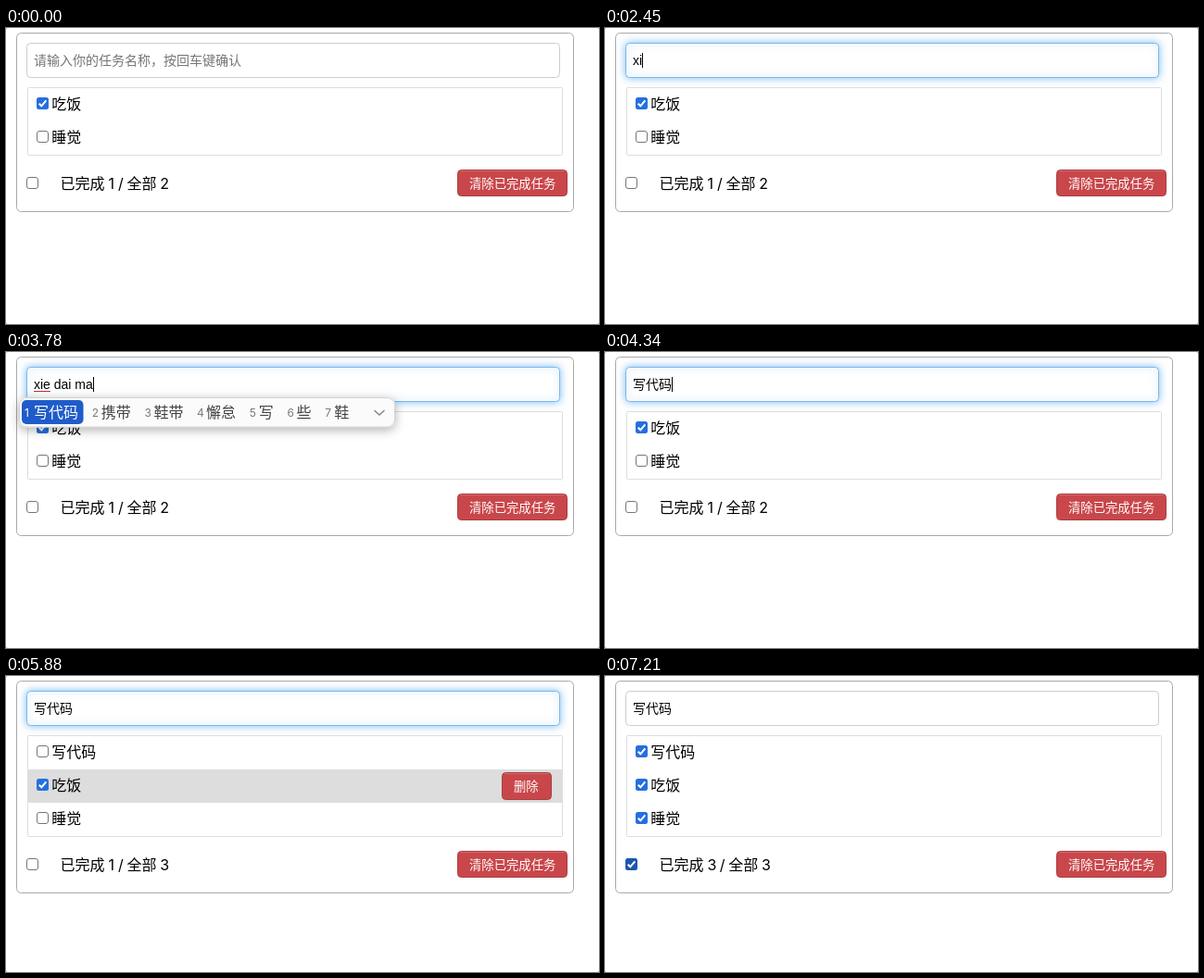
These frames come from a looping animation (640x320 px, 8000 ms). An HTML page with a canvas:

```html
<!DOCTYPE html>
<html lang="zh-CN">
<head>
<meta charset="utf-8">
<title>任务清单</title>
<style>
html, body { margin: 0; width: 100%; height: 100%; overflow: hidden; background: #fff; }
canvas { display: block; width: 640px; height: 320px; }
</style>
</head>
<body>
<canvas id="stage"></canvas>
<script>
const LOOP = 8000;
const CJK = '"Noto Sans CJK SC", "Noto Sans CJK", sans-serif';
const LATIN = '"Liberation Sans", Arial, sans-serif';
const UI = 'Inter, sans-serif';

const canvas = document.getElementById('stage');
const ctx = canvas.getContext('2d');
const dpr = window.devicePixelRatio || 1;
canvas.width = 640 * dpr;
canvas.height = 320 * dpr;
ctx.scale(dpr, dpr);

// Each track holds [start time, value] steps.
const typed = [
  [0, ''], [1820, 'x'], [1960, 'xi'], [2100, 'xie'], [2450, 'xi'], [2520, 'x'], [2660, ''],
  [3010, 'x'], [3080, 'xi'], [3150, 'xie'], [3360, 'xie d'], [3430, 'xie da'],
  [3570, 'xie dai'], [3710, 'xie dai m'], [3780, 'xie dai ma'], [3920, '写代码']
];
const caret = [
  [0, false], [1190, true], [1680, false], [1820, true], [4480, false], [5040, true],
  [5530, false], [6090, true], [6580, false]
];
const candidates = [
  [0, ''], [3010, '写 小 想 下 ⬇ 向 新 🆕'], [3080, '系 洗 西 细 喜 戏 吸 希'],
  [3150, '写 些 谢 鞋 斜 歇 携 协'], [3360, '写的 写到 谢的 写 些 谢 鞋'],
  [3430, '写大 写打 写 些 谢 鞋 斜'], [3640, '携带 鞋带 懈怠 写 些 鞋'],
  [3710, '写代码 携带 鞋带 懈怠 写 些 鞋'], [3920, '']
];
const hoverRow = [
  [0, -1], [4480, 0], [5460, 1], [5530, 0], [5880, 1], [6020, 2], [6090, -1]
];

function at(track, t) {
  let value = track[0][1];
  for (const [start, v] of track) if (t >= start) value = v;
  return value;
}

function text(str, x, y, size, color, family = CJK, weight = 400) {
  ctx.font = `${weight} ${size}px ${family}`;
  ctx.fillStyle = color;
  ctx.fillText(str, x, y);
  return ctx.measureText(str).width;
}

function box(x, y, w, h, r, fill, stroke) {
  ctx.beginPath();
  ctx.roundRect(x, y, w, h, r);
  if (fill) { ctx.fillStyle = fill; ctx.fill(); }
  if (stroke) { ctx.strokeStyle = stroke; ctx.lineWidth = 1; ctx.stroke(); }
}

function line(points, color, width) {
  ctx.beginPath();
  points.forEach(([x, y]) => ctx.lineTo(x, y));
  ctx.strokeStyle = color;
  ctx.lineWidth = width;
  ctx.stroke();
}

function shadow(color, blur, dy = 0) {
  ctx.shadowColor = color;
  ctx.shadowBlur = blur * dpr;
  ctx.shadowOffsetY = dy * dpr;
}

function checkbox(x, y, checked, hovered) {
  if (!checked) {
    box(x + .5, y + .5, 12, 12, 2.5, '#fff', hovered ? '#4f4f4f' : '#767676');
    return;
  }
  box(x, y, 13, 13, 2.5, hovered ? '#1b57ad' : '#2570de');
  line([[x + 2.7, y + 6.7], [x + 5.3, y + 9.3], [x + 10.3, y + 3.3]], '#fff', 2);
}

function button(label, x, y, w, h) {
  shadow('rgba(0,0,0,.08)', 2, 1);
  box(x + .5, y + .5, w - 1, h - 1, 4, '#c9474b');
  shadow('transparent', 0);
  line([[x + 3, y + 1.5], [x + w - 3, y + 1.5]], 'rgba(255,255,255,.2)', 1);
  box(x + .5, y + .5, w - 1, h - 1, 4, null, '#a83c40');
  text(label, x + 13, y + h / 2 + 5, 13.333, '#fff');
}

function input(t, value) {
  const focused = t >= 1190 && t < 7140;
  if (focused) shadow('rgba(82,168,236,.75)', 8);
  box(22.5, 16.5, 575, 37, 4, '#fff', focused ? '#7db8e8' : '#ccc');
  shadow('transparent', 0);

  let width = 0;
  if (!value) {
    text('请输入你的任务名称，按回车键确认', 30, 40.3, 14, '#757575');
  } else {
    const latin = value[0] === 'x';
    width = text(value, 30, latin ? 40 : 40.3, 14, '#000', latin ? LATIN : CJK);
  }
  if (t >= 3010 && t < 3920) {
    const first = value.split(' ')[0];
    ctx.font = `14px ${LATIN}`;
    ctx.fillStyle = first === value ? '#222' : '#a33';
    ctx.fillRect(30, 42, ctx.measureText(first).width, 1);
  }
  if (focused && at(caret, t)) {
    ctx.fillStyle = '#000';
    ctx.fillRect(30 + Math.round(width), 27, 1, 16);
  }
}

function emoji(kind, x) {
  const g = ctx.createLinearGradient(0, 54, 0, 74);
  g.addColorStop(0, '#86a5ba');
  g.addColorStop(1, '#587b98');
  box(x, 54, 20, 20, 3.5, g);
  if (kind === '🆕') {
    text('NEW', x + 2, 66.6, 7, '#fff', UI, 700);
    return;
  }
  ctx.fillStyle = '#fff';
  ctx.fillRect(x + 7.5, 57, 5, 7);
  ctx.beginPath();
  ctx.moveTo(x + 3.5, 63.5);
  ctx.lineTo(x + 16.5, 63.5);
  ctx.lineTo(x + 10, 71);
  ctx.fill();
}

function popup(words) {
  shadow('rgba(0,0,0,.3)', 11, 3);
  box(14, 49, 406, 32.5, 8, '#fbfbfb');
  shadow('transparent', 0);
  box(14.5, 49.5, 405, 31.5, 8, null, '#d2d2d2');

  let x = 20;
  words.split(' ').forEach((word, i) => {
    const picture = word === '⬇' || word === '🆕';
    const width = picture ? 22 : word.length * 16;
    if (!i) box(17, 52, width + 18.5, 26, 5, '#1f5cca');
    text(i + 1, x, 69.5, 12, i ? '#7a7a7a' : '#fff', UI);
    if (picture) emoji(word, x + 11);
    else text(word, x + 10, 71, 16, i ? '#444' : '#fff');
    x += width + 24.7;
  });
  line([[397.5, 63], [403, 68], [408.5, 63]], '#808080', 1.3);
}

function summary(done, total, y) {
  const shift = done > 1 ? 2.7 : 0;
  text('已完成', 58.5, y, 16, '#000');
  text(done, 110.5, y, 16, '#000', UI);
  text('/', 121 + shift, y, 16, '#000', UI);
  text('全部', 130.5 + shift, y, 16, '#000');
  text(total, 166.3 + shift, y, 16, '#000', UI);
}

function draw(t) {
  const added = t >= 5460;
  const all = t >= 7210;
  const tasks = [['吃饭', true], ['睡觉', false]];
  if (added) tasks.unshift(['写代码', false]);
  const bottom = 65 + tasks.length * 36;
  const hovered = at(hoverRow, t);

  ctx.fillStyle = '#fff';
  ctx.fillRect(0, 0, 640, 320);
  ctx.fillStyle = '#bbb';
  for (const x of [0, 639]) for (const y of [0, 319]) ctx.fillRect(x, y, 1, 1);

  box(11.5, 5.5, 601, bottom + 56, 5, '#fff', '#a8a8a8');
  input(t, at(typed, t));

  box(23.5, 64.5, 577, bottom - 64, 1, '#fff', '#ddd');
  tasks.forEach(([name, done], i) => {
    const y = 65 + i * 36;
    if (i === hovered) {
      ctx.fillStyle = '#ddd';
      ctx.fillRect(23, y, 578, 36);
      button('删除', 535, y + 3, 54, 30);
    }
    checkbox(33, y + 10, done || all, false);
    text(name, 49.3, y + 23.4, 16, '#000');
  });

  checkbox(22, bottom + 24, all, t >= 6300);
  summary(all ? 3 : 1, tasks.length, bottom + 37);
  button('清除已完成任务', 487, bottom + 16, 119, 29);

  const words = at(candidates, t);
  if (words) popup(words);
}

const start = performance.now();
function tick() {
  draw((performance.now() - start) % LOOP);
  requestAnimationFrame(tick);
}
tick();
</script>
</body>
</html>
```
